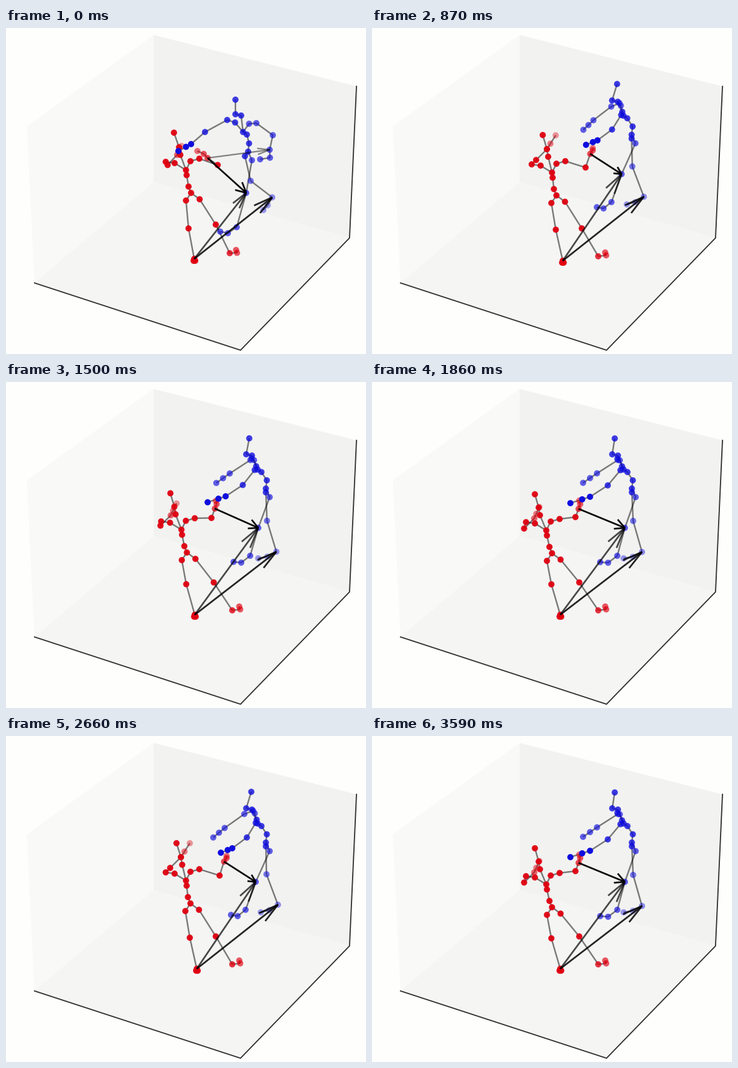
Animation, 568 px wide and 514 px high, one loop 3.63 s. Source, as a matplotlib script:

```python
import numpy as np
import matplotlib.pyplot as plt
from matplotlib.animation import FuncAnimation
from matplotlib.collections import LineCollection

W, H, DPI = 568, 514, 64
PT = 72 / DPI
FRAME_MS, LOOP_MS = 30, 3630

# The view refreshes in bursts: first time, last time, number of refreshes.
BURSTS = [(410, 870, 7), (960, 1460, 7), (1500, 1960, 9),
          (2050, 2550, 11), (2660, 3180, 14), (3250, 3590, 5)]
REFRESH = np.concatenate([[0]] + [np.linspace(*b) for b in BURSTS])
CYCLES = (410, 2050, 3830)  # start of each dance cycle

CHAINS = ["pelvis spine1 spine2 chest neck head top",
          "chest collar_l shoulder_l elbow_l wrist_l hand_l tip_l",
          "chest collar_r shoulder_r elbow_r wrist_r hand_r tip_r",
          "pelvis hip_l knee_l ankle_l heel_l toe_l",
          "pelvis hip_r knee_r ankle_r heel_r toe_r"]
BONES = [pair for c in CHAINS for pair in zip(c.split(), c.split()[1:])]
JOINTS = list(dict.fromkeys(j for c in CHAINS for j in c.split()))


def smooth(x, a, b):
    u = np.clip((x - a) / (b - a), 0, 1)
    return u * u * (3 - 2 * u)


class Phase:
    """Weights of the dance: rise from the crouch, pull back, drop again."""

    def __init__(self, t):
        p = np.interp(t, CYCLES, (0, 1, 2)) % 1
        rise, drop = smooth(p, 0, .3), smooth(p, .88, 1)
        self.up = rise - drop
        self.late = rise**1.6 - drop
        self.back = smooth(p, .45, .75) - drop
        self.swing = np.sin(np.pi * rise**1.15)

    def at(self, low, high, back=(0, 0), swing=(0, 0), late=False):
        low, high, back, swing = map(np.array, (low, high, back, swing))
        up = self.late if late else self.up
        return low + up * (high - low) + self.back * back + self.swing * swing

    def arm(self, *args):
        return self.at(*args, late=True)


def red_pose(m):
    p = dict(
        pelvis=m.at((292, 260), (291, 264), (-7, 6)),
        chest=m.at((284, 224), (284, 228), (-9, 6)),
        head=m.at((273, 188), (276, 191), (-13, 7)),
        top=m.at((265, 165), (269, 169), (-12, 8), (10, -5)),
        elbow_r=m.at((334, 216), (337, 220), (-16, -7)),
        wrist_r=m.at((318, 205), (344, 198), (-18, 2), (14, 8)),
        tip_r=m.at((302, 194), (348, 189), (-21, -2), (18, 8)),
        elbow_l=m.at((255, 216), (259, 208), (-19, 23)),
        wrist_l=m.at((270, 200), (276, 191), (-20, 24)),
        tip_l=m.at((277, 186), (290, 169), (-26, 28)),
        knee_l=m.at((288, 316), (290, 318), (-7, 1)),
        ankle_l=m.at((297, 364), (301, 367), (-4, 0)),
        knee_r=m.at((331, 310), (331, 316), (-4, 0)),
        ankle_r=m.at((353, 355), (357, 360)),
        toe_r=m.at((363, 350), (368, 354)),
    )
    chest, pelvis = p["chest"], p["pelvis"]
    p.update(
        spine1=pelvis + (-4, -10), spine2=chest + (1, 8), neck=p["head"] + (2, 12),
        collar_l=chest + (-18, -11), shoulder_l=chest + (-32, -13),
        collar_r=chest + (7, -14), shoulder_r=chest + (21, -18),
        hand_l=.6 * p["wrist_l"] + .4 * p["tip_l"],
        hand_r=(p["wrist_r"] + p["tip_r"]) / 2 + (2, -1),
        hip_l=pelvis + (-8, 12), hip_r=pelvis + (13.5, 10),
        heel_l=p["ankle_l"] + (-1, 3), toe_l=p["ankle_l"] + (1.5, 3),
        heel_r=p["toe_r"] + (1.5, 4.5),
    )
    return p


def blue_pose(m):
    p = dict(
        pelvis=m.at((382, 195), (410, 168)),
        chest=m.at((374, 164), (397, 138)),
        head=m.at((362, 136), (379, 114)),
        top=m.at((362, 113), (387, 88), (-4, 1)),
        shoulder_l=m.arm((349, 145), (394, 137), (-2, 2)),
        elbow_l=m.arm((314, 164), (380, 160), (-8, 3)),
        wrist_l=m.arm((292, 183), (357, 177), (-13, 4)),
        tip_l=m.arm((272, 194), (339, 184), (-26, 7)),
        shoulder_r=m.arm((395, 150), (390, 118), (-3, 3), (11, 0)),
        elbow_r=m.arm((421, 169), (376, 123), (12, 0), (14, 0)),
        wrist_r=m.arm((416, 192), (345, 145), (10, -1), (67, -11)),
        tip_r=m.arm((401, 207), (327, 160), (6, -1), (115, -10)),
        knee_l=m.at((386, 241), (411, 218), (1, 1)),
        ankle_l=m.at((420, 267), (429, 266), (-3, 2)),
        toe_l=m.at((406, 287), (402, 278), (-5, 0)),
        knee_r=m.at((379, 260), (394, 230), (5, 0)),
        ankle_r=m.at((364, 314), (378, 274), (9, 0)),
        toe_r=m.at((338, 321), (355, 282), (5, 2)),
    )
    chest, pelvis = p["chest"], p["pelvis"]
    p.update(
        spine1=pelvis + (1.5, -13), spine2=chest + (6, 4), neck=p["head"] + (9, 2),
        collar_l=(chest + p["shoulder_l"]) / 2 + (0, -5.5),
        collar_r=(chest + p["shoulder_r"]) / 2 + (-1, -6),
        hand_l=.6 * p["wrist_l"] + .4 * p["tip_l"],
        hand_r=(p["wrist_r"] + p["tip_r"]) / 2 + m.at((8, 5), (0, 0)),
        hip_l=pelvis + m.at((-5, 7), (0, 6)), hip_r=pelvis + (6, 13.5),
        heel_l=(p["ankle_l"] + p["toe_l"]) / 2 + (0, 2.5),
        heel_r=(p["ankle_r"] + p["toe_r"]) / 2 + (-1, 6),
    )
    return p


def arrow(a, b, ratio=.2, angle=14):
    """Shaft and two open barbs."""
    back = (a - b) * ratio
    segs = [(a, b)]
    for r in np.radians([angle, -angle]):
        c, s = np.cos(r), np.sin(r)
        segs.append((b, b + (c * back[0] - s * back[1], s * back[0] + c * back[1])))
    return segs


fig = plt.figure(figsize=(W / DPI, H / DPI), dpi=DPI, facecolor="#fefefd")
ax = fig.add_axes([0, 0, 1, 1])
ax.set(xlim=(0, W), ylim=(H, 0))
ax.axis("off")

LEFT, NEAR, RIGHT, BACK = (45, 402), (370, 508), (542, 331), (233, 243)
LEFT_TOP, RIGHT_TOP, BACK_TOP = (33, 155), (553, 92), (233, 11)
for corners, color in [((LEFT_TOP, BACK_TOP, BACK, LEFT), "#f9f9f8"),
                       ((BACK_TOP, RIGHT_TOP, RIGHT, BACK), "#f2f2f1"),
                       ((LEFT, BACK, RIGHT, NEAR), "#f5f5f4")]:
    ax.add_patch(plt.Polygon(corners, fc=color, lw=0))
ax.plot(*zip(LEFT, NEAR, RIGHT, RIGHT_TOP), color="#303030", lw=1.8 * PT)


def strokes(alpha, width, z):
    lines = LineCollection([], colors="black", alpha=alpha, linewidths=width * PT, zorder=z)
    return ax.add_collection(lines)


def dots(rgb, fade, default):
    """Joints further from the viewer are paler; fade is keyed by name."""
    colors = [(*rgb, fade.get(j, fade.get(j[-2:], default))) for j in JOINTS]
    return ax.scatter(*np.zeros((2, len(JOINTS))), s=(9.8 * PT)**2, c=colors, lw=0, zorder=4)


red_bones, blue_bones = strokes(.5, 2.4, 3), strokes(.5, 2.4, 3)
red_dots = dots((.88, 0, .06), dict(wrist_l=.6, hand_l=.5, tip_l=.4, wrist_r=.7, hand_r=.65,
                                    tip_r=.55, ankle_r=.8, heel_r=.65, toe_r=.65), .95)
blue_dots = dots((.06, .05, .87), dict(wrist_l=1, hand_l=1, tip_l=1, knee_l=.55, ankle_l=.45,
                                       heel_l=.35, toe_l=.4, _r=.65), .8)
reach, pull = strokes(.45, 2.3, 5), strokes(.95, 2.7, 5)
lean, stride = strokes(.7, 2.7, 5), strokes(.85, 2.7, 5)


def update(i):
    now = REFRESH[np.searchsorted(REFRESH, (i + 1) * FRAME_MS - 1, side="right") - 1]
    moment = Phase(now)
    red, blue = red_pose(moment), blue_pose(moment)
    for p, bones, joints in [(red, red_bones, red_dots), (blue, blue_bones, blue_dots)]:
        bones.set_segments([(p[a], p[b]) for a, b in BONES])
        joints.set_offsets([p[j] for j in JOINTS])
    hand, foot = red["wrist_r"], red["ankle_l"]
    # The reach shows only while the far arm is stretched out.
    out = blue["wrist_r"][0] > 400
    reach.set_segments(arrow(hand, blue["wrist_r"]) if out else [])
    pull.set_segments(arrow(hand, blue["knee_r"], .22, 27))
    lean.set_segments(arrow(foot, blue["knee_r"]))
    stride.set_segments(arrow(foot, blue["ankle_l"]))
    return red_bones, blue_bones, red_dots, blue_dots, reach, pull, lean, stride


anim = FuncAnimation(fig, update, frames=LOOP_MS // FRAME_MS, interval=FRAME_MS,
                     repeat=True, repeat_delay=0, blit=False)
plt.show()
```
